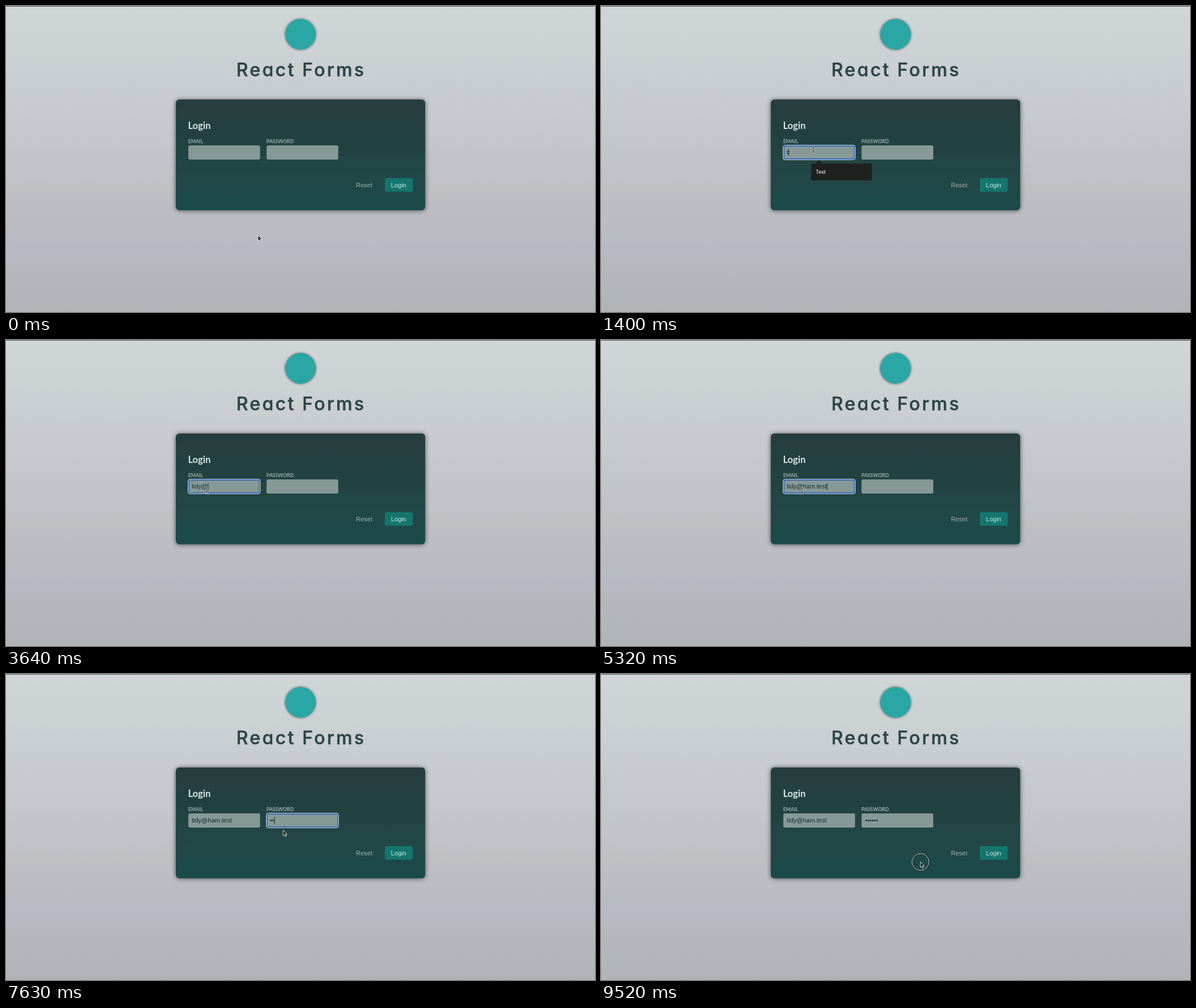
Animation, 1037 px wide and 540 px high, one loop 9.59 s. Source, as an HTML page:

```html
<!DOCTYPE html>
<html lang="en">
<head>
<meta charset="utf-8">
<title>React Forms</title>
<style>
  html, body { margin: 0; width: 100%; height: 100%; overflow: hidden; background: #b5b8bc; }
  svg { display: block; width: 1037px; height: 540px; }
  .title { font: 500 32px Inter, sans-serif; letter-spacing: 3.3px; font-feature-settings: "cv11";
    fill: #2b4546; stroke: #2b4546; stroke-width: .5; stroke-linejoin: round; }
  .heading { font: 700 16.6px Lato, sans-serif; fill: #d9e6ea; }
  .label { font: 700 8.6px Lato, sans-serif; fill: #9db1b1; }
  .control { font: 11px "Liberation Sans", Arial, sans-serif; }
  .error { font: 9.4px "Noto Serif", "Noto Sans CJK KR", serif; fill: #d8ae8a; }
  .hint { font: 500 8.6px Inter, sans-serif; fill: #f1f1f1; }
  .field { fill: #869997; }
  .value { fill: #1c2b2b; }
  .caret { fill: #142020; }
  .focus rect { fill: none; }
</style>
</head>
<body>
<svg viewBox="0 0 1037 540">
  <defs>
    <linearGradient id="page" x2="0" y2="1">
      <stop stop-color="#d0d6d8"/>
      <stop offset=".3" stop-color="#c8ccd0"/>
      <stop offset=".6" stop-color="#bec0c4"/>
      <stop offset=".72" stop-color="#babcc1"/>
      <stop offset=".78" stop-color="#b7bac4"/>
      <stop offset=".88" stop-color="#b4b7bb"/>
      <stop offset="1" stop-color="#b1b4b7"/>
    </linearGradient>
    <linearGradient id="card" x2="0" y2="1">
      <stop stop-color="#263d3d"/>
      <stop offset="1" stop-color="#1e4a4a"/>
    </linearGradient>
    <filter id="shadow" x="-20%" y="-20%" width="140%" height="140%">
      <feDropShadow dx="0" dy=".5" stdDeviation="4.5" flood-opacity=".6"/>
    </filter>
    <filter id="glow" x="-30%" y="-30%" width="160%" height="160%">
      <feDropShadow dx="0" dy="0" stdDeviation="2" flood-opacity=".65"/>
    </filter>
    <path id="beamShape" d="M-2.5-5Q0-5 0-3.5Q0-5 2.5-5M0-4V4M-2.5 5Q0 5 0 3.5Q0 5 2.5 5M-1.3 1.5H1.3"/>
  </defs>

  <rect width="1037" height="540" fill="url(#page)"/>
  <rect width="1037" height="1" fill="#4b4d4f"/>
  <circle cx="518.5" cy="50" r="27" fill="#2ca6a4" filter="url(#glow)"/>
  <text class="title" y="123.7"><tspan x="405.5">React</tspan><tspan x="521.5">Forms</tspan></text>

  <rect x="299" y="165" width="439" height="195.5" rx="6" fill="url(#card)" filter="url(#shadow)"/>
  <text class="heading" x="320.4" y="216.5">Login</text>
  <text class="control" x="616.3" y="319.5" fill="#9db1b1">Reset</text>
  <rect x="667" y="303.8" width="49" height="24" rx="3" fill="#14766e"/>
  <text class="control" x="677.8" y="319.5" fill="#cde9e6">Login</text>

  <g id="email"></g>
  <g id="password"></g>

  <g id="popup">
    <path d="M377 278.5L383.5 272L390 278.5Z" fill="#1f2020"/>
    <rect x="370" y="278" width="107" height="30" rx="3" fill="#1f2020"/>
    <text class="hint" x="378" y="296.3">Test</text>
  </g>

  <g id="pointer">
    <g id="ring" fill="none">
      <circle stroke="#111" stroke-width="2.6" stroke-opacity=".75"/>
      <circle stroke="#dfe5e5"/>
    </g>
    <path id="arrow" d="M0 0V9.4L2.2 7.4L3.8 11L5.4 10.3L3.8 6.8H6.9Z"
      stroke="#fff" stroke-width=".9" stroke-linejoin="round"/>
    <g id="beam" fill="none">
      <use href="#beamShape" stroke="#eee" stroke-width="2.2"/>
      <use href="#beamShape" stroke="#111" stroke-width=".9"/>
    </g>
  </g>
</svg>
<script>
const LOOP = 9590, STEP = 70, TRAVEL = 300, RING = 140;
const FIELD = { y: 246, width: 126.3, height: 25 };
const $ = id => document.getElementById(id);
const show = (el, on) => { el.style.display = on ? "" : "none"; };

// A burst of key presses: first time, number of keys, interval
const burst = (first, count, gap) => Array.from({ length: count }, (_, i) => first + i * gap);

const fields = [
  { id: "email", x: 321, label: "EMAIL", text: "tidy@ham.test", minLength: 5,
    error: "이메일 유형이 잘못되었습니다.",
    keys: [...burst(1400, 1, 0), ...burst(2660, 4, 280), ...burst(4130, 8, 120)] },
  { id: "password", x: 458.7, label: "PASSWORD", text: "••••••", minLength: 6,
    error: "비밀번호는 6글자 이상이어야 합니다.",
    keys: [...burst(7490, 2, 70), ...burst(8610, 4, 230)] }
];

// Pointer stops: it arrives at each one at the given time
const stop = (time, x, y) => ({ time, x, y });
const click = (time, x, y) => ({ time, x, y, pressed: true, field: fieldAt(x, y) });
const stops = [
  stop(0, 443.7, 405), stop(350, 402, 312), stop(700, 374, 254), click(980, 374, 254),
  click(1820, 372, 345), click(2310, 351, 262), stop(3360, 353, 265),
  click(5600, 440, 374), click(6020, 499, 260), stop(6370, 495.5, 276),
  click(6650, 486, 317), click(7140, 488, 260), stop(7630, 488, 276),
  click(7910, 494, 310), click(8260, 490, 256), click(9520, 562.3, 331.7)
];
const clicks = stops.filter(s => s.pressed);

function fieldAt(x, y) {
  return fields.find(f => x > f.x && x < f.x + FIELD.width && y > FIELD.y && y < FIELD.y + FIELD.height);
}

for (const f of fields) {
  const g = $(f.id), { width, height } = FIELD;
  g.setAttribute("transform", `translate(${f.x} ${FIELD.y})`);
  g.innerHTML = `
    <text class="label" x="-.2" y="-4">${f.label}</text>
    <rect class="field" width="${width}" height="${height}" rx="3"/>
    <g class="focus">
      <rect x=".9" y=".9" width="${width - 1.8}" height="${height - 1.8}" rx="2.5" stroke="#1c58b8" stroke-width="1.6"/>
      <rect x="-.3" y="-.3" width="${width + .6}" height="${height + .6}" rx="3.2" stroke="#e6eff6"/>
    </g>
    <text class="control value" x="6" y="16.3"></text>
    <rect class="caret" y="6.5" width="1" height="12"/>
    <text class="error" y="39">${f.error}</text>`;
  for (const part of ["focus", "value", "caret", "error"]) f[part + "El"] = g.querySelector("." + part);
}

function pointerAt(t) {
  const next = stops.findIndex(s => s.time > t);
  if (next < 0) return stops.at(-1);
  const a = stops[next - 1], b = stops[next];
  const u = Math.max(0, 1 - (b.time - t) / Math.min(TRAVEL, b.time - a.time));
  const k = u * u * (3 - 2 * u);
  return { x: a.x + (b.x - a.x) * k, y: a.y + (b.y - a.y) * k };
}

function drawField(f, t, past) {
  const typed = f.keys.filter(k => k <= t);
  const last = past.at(-1);
  const focused = last?.field === f && t >= last.time + STEP;
  const blur = past.findLast((c, i) => i && past[i - 1].field === f);
  const invalid = typed.length < f.minLength && blur?.time > (typed.at(-1) ?? 0);
  f.valueEl.textContent = f.text.slice(0, typed.length);
  f.caretEl.setAttribute("x", 6 + (typed.length ? f.valueEl.getComputedTextLength() : 0));
  show(f.focusEl, focused);
  show(f.caretEl, focused);
  show(f.errorEl, invalid);
  if (f.id === "email") show($("popup"), focused && typed.length > 0 && typed.length < f.minLength);
}

function drawPointer(t, last) {
  const { x, y } = pointerAt(t), over = fieldAt(x, y);
  $("pointer").setAttribute("transform", `translate(${x} ${y})`);
  show($("beam"), over);
  show($("arrow"), !over);
  show($("ring"), last && t < last.time + RING);
  for (const c of $("ring").children) c.setAttribute("r", over ? 11.8 : 15);
}

function frame(now) {
  const t = Math.floor(now % LOOP / STEP) * STEP;
  const past = clicks.filter(c => c.time <= t);
  fields.forEach(f => drawField(f, t, past));
  drawPointer(t, past.at(-1));
  requestAnimationFrame(frame);
}
frame(0);
</script>
</body>
</html>
```
